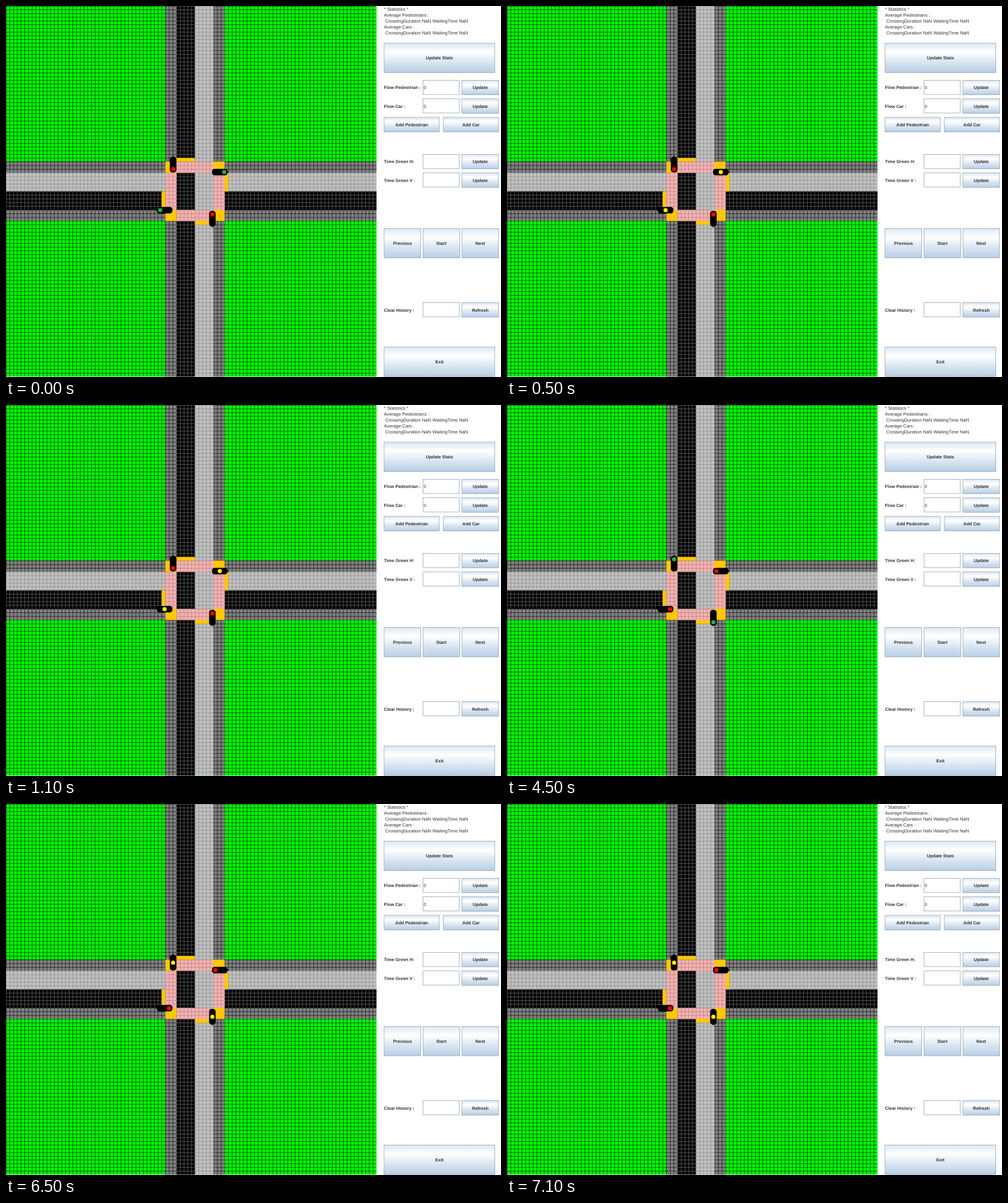
Recreate the animation shown at these times as an HTML page. Size 835 by 626 pixels, loop 7.5 s.

```html
<!DOCTYPE html>
<html lang="en">
<head>
<meta charset="utf-8">
<title>Crossroads simulator</title>
<style>
html, body { margin: 0; width: 100%; height: 100%; overflow: hidden; background: #fff; }
svg { display: block; width: 835px; height: 626px; }
text { font: 12px "Liberation Sans", Arial, sans-serif; fill: #333; white-space: pre; text-rendering: geometricPrecision; }
.bold { font-weight: bold; }
.stats { font-size: 12.4px; }
</style>
</head>
<body>
<svg id="stage" viewBox="0 0 1336 1001" preserveAspectRatio="none">
  <defs>
    <linearGradient id="ocean" x1="0" y1="0" x2="0" y2="1">
      <stop offset="0" stop-color="#dde8f3"/>
      <stop offset=".3" stop-color="#fff"/>
      <stop offset=".6" stop-color="#dde8f3"/>
      <stop offset="1" stop-color="#b8cfe5"/>
    </linearGradient>
  </defs>
</svg>
<script>
const stage = document.getElementById('stage');
const CELL = 10;

function add(tag, attrs, parent = stage) {
  const el = document.createElementNS('http://www.w3.org/2000/svg', tag);
  for (const key in attrs) el.setAttribute(key, attrs[key]);
  parent.appendChild(el);
  return el;
}

function label(x, y, str, cls, anchor = 'start') {
  add('text', { x, y, class: cls, 'text-anchor': anchor }).textContent = str;
}

// A block of grid cells, each lined on its top and left; plain when no line colour is given
function area(col, row, cols, rows, fill, line) {
  const x = col * CELL, y = row * CELL, w = cols * CELL, h = rows * CELL;
  add('rect', { x, y, width: w, height: h, fill });
  if (!line) return;
  let d = '';
  for (let i = 0; i < cols; i++) d += `M${x + i * CELL + 0.5} ${y}v${h}`;
  for (let i = 0; i < rows; i++) d += `M${x} ${y + i * CELL + 0.5}h${w}`;
  add('path', { d, stroke: line, 'stroke-width': 1, fill: 'none' });
}

function drawMap() {
  const grass = ['#0f0', '#000'], walk = ['#808080', '#000'];
  const dark = ['#000', '#808080'], pale = ['#c0c0c0', '#808080'];
  const zebra = ['#ffafaf', '#808080'], wait = '#ffc800';

  area(0, 0, 100, 100, ...grass);
  for (const row of [42, 55]) area(0, row, 100, 3, ...walk);
  for (const col of [43, 56]) area(col, 0, 3, 100, ...walk);
  area(0, 45, 100, 5, ...pale);
  area(0, 50, 100, 5, ...dark);
  area(46, 0, 5, 100, ...dark);
  area(51, 0, 5, 100, ...pale);

  for (const row of [42, 55]) area(46, row, 10, 3, ...zebra);
  for (const col of [43, 56]) area(col, 45, 3, 10, ...zebra);
  for (const col of [43, 56]) for (const row of [42, 55]) area(col, row, 3, 3, wait);
  area(46, 41, 5, 1, wait);
  area(59, 45, 1, 5, wait);
  area(42, 50, 1, 5, wait);
  area(51, 58, 5, 1, wait);
}

function button(x, y, w, h, str) {
  add('rect', { x: x + 0.5, y: y + 0.5, width: w - 1, height: h - 1, fill: 'url(#ocean)', stroke: '#7a8a99' });
  label(x + w / 2, y + h / 2 + 4.5, str, 'bold', 'middle');
}

function field(y, name, value, action) {
  label(1020, y + 24.5, name, 'bold');
  add('rect', { x: 1125.5, y: y + 0.5, width: 98, height: 38, fill: '#fff', stroke: '#7a8a99' });
  label(1127, y + 24.5, value, '');
  button(1230, y, 100, 40, action);
}

function drawPanel() {
  const stats = ' CrossingDuration NaN WaitingTime NaN';
  ['* Statistics *', 'Average Pedestrians :', stats, 'Average Cars :', stats]
    .forEach((str, i) => label(1020, 13 + i * 16, str, 'stats'));

  button(1020, 100, 300, 80, 'Update Stats');
  field(200, 'Flow Pedestrian :', '0', 'Update');
  field(250, 'Flow Car :', '0', 'Update');
  button(1020, 300, 150, 40, 'Add Pedestrian');
  button(1180, 300, 150, 40, 'Add Car');
  field(400, 'Time Green H:', '', 'Update');
  field(450, 'Time Green V :', '', 'Update');
  ['Previous', 'Start', 'Next'].forEach((str, i) => button(1020 + i * 105, 600, 100, 80, str));
  field(800, 'Clear History :', '', 'Refresh');
  button(1020, 920, 300, 80, 'Exit');
}

// Lamp housing with its green end at the top before turning
function lamp(x, y, turn) {
  const g = add('g', { transform: `translate(${x} ${y}) rotate(${turn})` });
  add('rect', { x: -1.6, y: -23, width: 3.2, height: 5, fill: '#000' }, g);
  add('rect', { x: -8.8, y: -21, width: 17.6, height: 42, rx: 7, fill: '#000' }, g);
  return add('circle', { r: 5.6 }, g);
}

const BULBS = {
  green: { cy: -12, fill: '#22b14c' },
  yellow: { cy: 0, fill: '#fff200' },
  red: { cy: 12, fill: '#f00' }
};

const PHASES = [
  { end: 500, h: 'green', v: 'red' },
  { end: 1500, h: 'yellow', v: 'red' },
  { end: 6500, h: 'red', v: 'green' },
  { end: 7500, h: 'red', v: 'yellow' }
];

drawMap();
drawPanel();
const lampsV = [lamp(451, 428, 0), lamp(557, 574, 180)];
const lampsH = [lamp(577, 448, 90), lamp(428, 551, 270)];

function light(bulb, state) {
  const { cy, fill } = BULBS[state];
  bulb.setAttribute('cy', cy);
  bulb.setAttribute('fill', fill);
}

function render(ms) {
  const t = ms % 7500;
  const phase = PHASES.find(p => t < p.end);
  lampsH.forEach(b => light(b, phase.h));
  lampsV.forEach(b => light(b, phase.v));
}

let start;
function tick(now) {
  start ??= now;
  render(Math.max(0, now - start));
  requestAnimationFrame(tick);
}
render(0);
requestAnimationFrame(tick);
</script>
</body>
</html>
```
